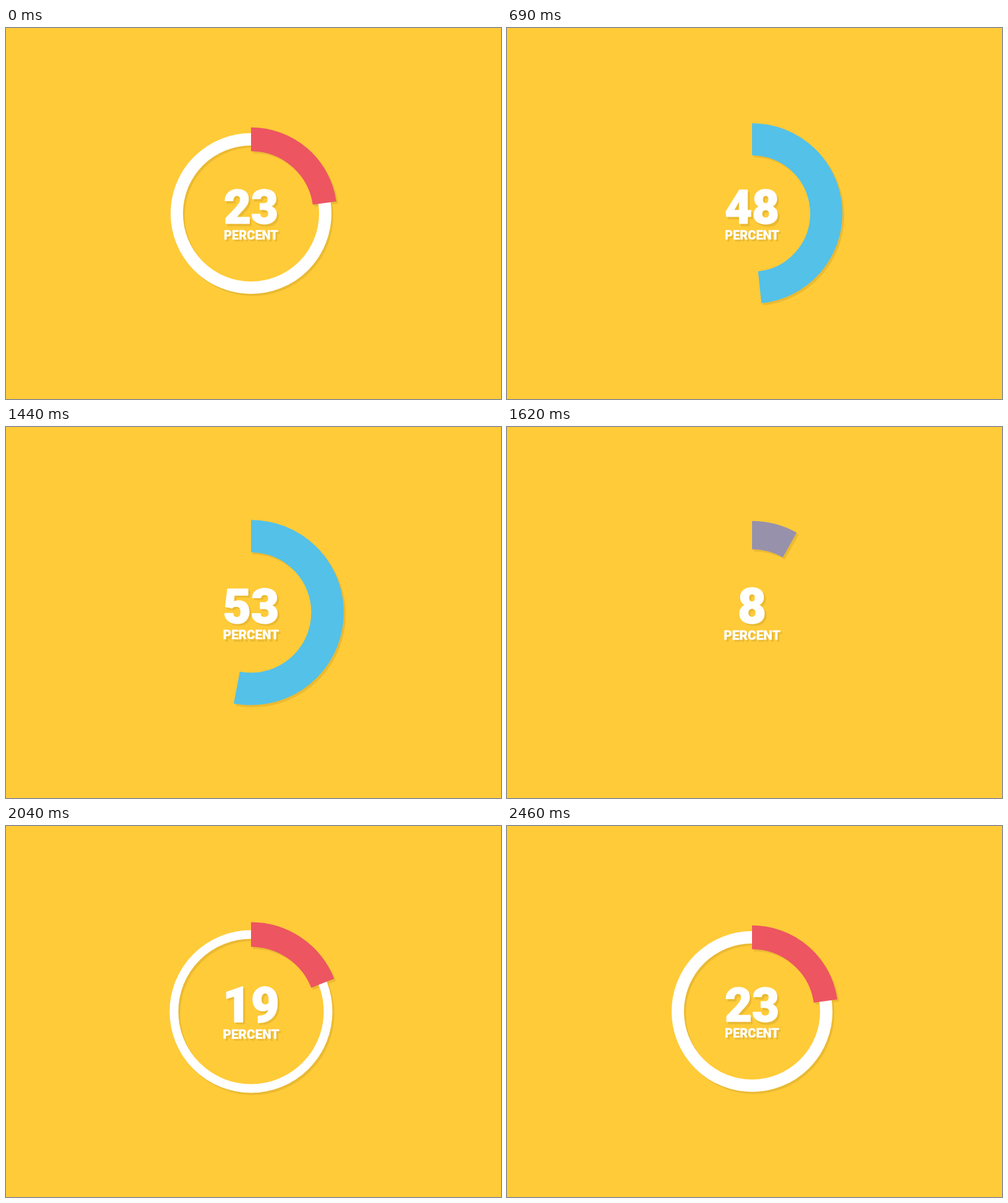
Write an HTML page that moves like this. It is 800x600 px and loops after 2490 ms.

```html
<!DOCTYPE html>
<html lang="en">
<head>
<meta charset="utf-8">
<title>Percent ring</title>
<style>
  html, body { margin: 0; width: 100%; height: 100%; overflow: hidden; background: #ffcb38; }
  svg { display: block; width: 100vw; height: 100vh; }
  circle { fill: none; }
  text {
    font-family: Roboto, Inter, sans-serif; font-weight: 900; text-anchor: middle;
    stroke-linejoin: round;
  }
  .num { font-size: 76px; stroke-width: 1.6px; }
  .label { font-size: 20px; stroke-width: .3px; }
  .front text { fill: #fff; stroke: #fff; }
  .shade text { fill: #000; stroke: #000; }
</style>
</head>
<body>
<svg viewBox="0 0 800 600">
  <g id="dial">
    <g class="shade" opacity=".08"></g>
    <g class="front"></g>
  </g>
</svg>
<script>
const LOOP = 2490, STEP = 30;
const RED = [237, 85, 97], BLUE = [84, 193, 232];
const dial = document.getElementById('dial');

const parts = `
  <circle class="track" r="120"/>
  <circle class="arc" r="120" pathLength="100" transform="rotate(-90)"/>
  <text class="num" y="16.2"></text>
  <text class="label" y="42">PERCENT</text>`;
const [shade, front] = ['.shade', '.front'].map(name => {
  const g = dial.querySelector(name);
  g.innerHTML = parts;
  const find = c => g.querySelector(c);
  return { g, track: find('.track'), arc: find('.arc'), num: find('.num') };
});

const clamp = x => Math.min(1, Math.max(0, x));
const smooth = x => x * x * (3 - 2 * x);
const quad = x => x < .5 ? 2 * x * x : 1 - 2 * (1 - x) * (1 - x);

// Smoothly joins [time, value] pairs.
function keys(t, list) {
  if (t <= list[0][0]) return list[0][1];
  for (let i = 1; i < list.length; i++) {
    const [t0, a] = list[i - 1], [t1, b] = list[i];
    if (t < t1) return a + (b - a) * smooth((t - t0) / (t1 - t0));
  }
  return list[list.length - 1][1];
}

const rise = (t, rate) => 1 - clamp(1 - t * rate) ** 8;
const fall = x => 1 - quad(clamp(x));

function percent(t) {
  if (t < 187) return 22.75 * fall(t / 187);
  if (t < 1450) return 53 * rise(t - 187, .000521);
  if (t < 1685) return 53 * fall((t - 1450) / 235);
  return 23 * rise(t - 1685, .000555);
}

const arcWidth = t => keys(t, [[0, 38.5], [187, 20], [360, 22.5], [680, 52],
  [990, 49.5], [1400, 51], [1480, 51], [1740, 38.5]]);
const trackWidth = t => keys(t, [[0, 20], [290, 40], [360, 38.5], [600, 35],
  [620, 0], [1640, 0], [1730, 23], [1800, 20.3], [2030, 13.5], [2330, 20]]);
const zoom = t => keys(t, [[1110, 1], [1440, 1.03], [1510, 1.07], [1800, .985],
  [1940, 1.062], [2040, 1.0375], [2160, 1]]);
const trackAlpha = t => t < 1000 ? clamp(1 - t / 600) : 1;

function tint(t) {
  const k = keys(t, [[60, 0], [400, 1], [1500, 1], [1760, 0]]);
  return `rgb(${RED.map((c, i) => Math.round(c + (BLUE[i] - c) * k))})`;
}

function paint(part, t, arcColor, trackColor) {
  const v = percent(t), w = trackWidth(t);
  part.track.setAttribute('stroke', w > .2 ? trackColor : 'none');
  part.track.setAttribute('stroke-width', w);
  part.track.setAttribute('opacity', trackAlpha(t));
  part.arc.setAttribute('stroke', v > .1 ? arcColor : 'none');
  part.arc.setAttribute('stroke-width', arcWidth(t));
  part.arc.setAttribute('stroke-dasharray', `${v} 200`);
  part.num.textContent = Math.round(v);
}

function draw(t) {
  dial.setAttribute('transform', `translate(396 300) scale(${zoom(t)})`);
  shade.g.setAttribute('transform', 'translate(3 3.3)');
  paint(shade, t, '#000', '#000');
  paint(front, t, tint(t), '#fff');
}

let start;
function tick(now) {
  start ??= now;
  const t = (now - start) % LOOP;
  draw(Math.floor(t / STEP) * STEP);
  requestAnimationFrame(tick);
}
draw(0);
requestAnimationFrame(tick);
</script>
</body>
</html>
```
